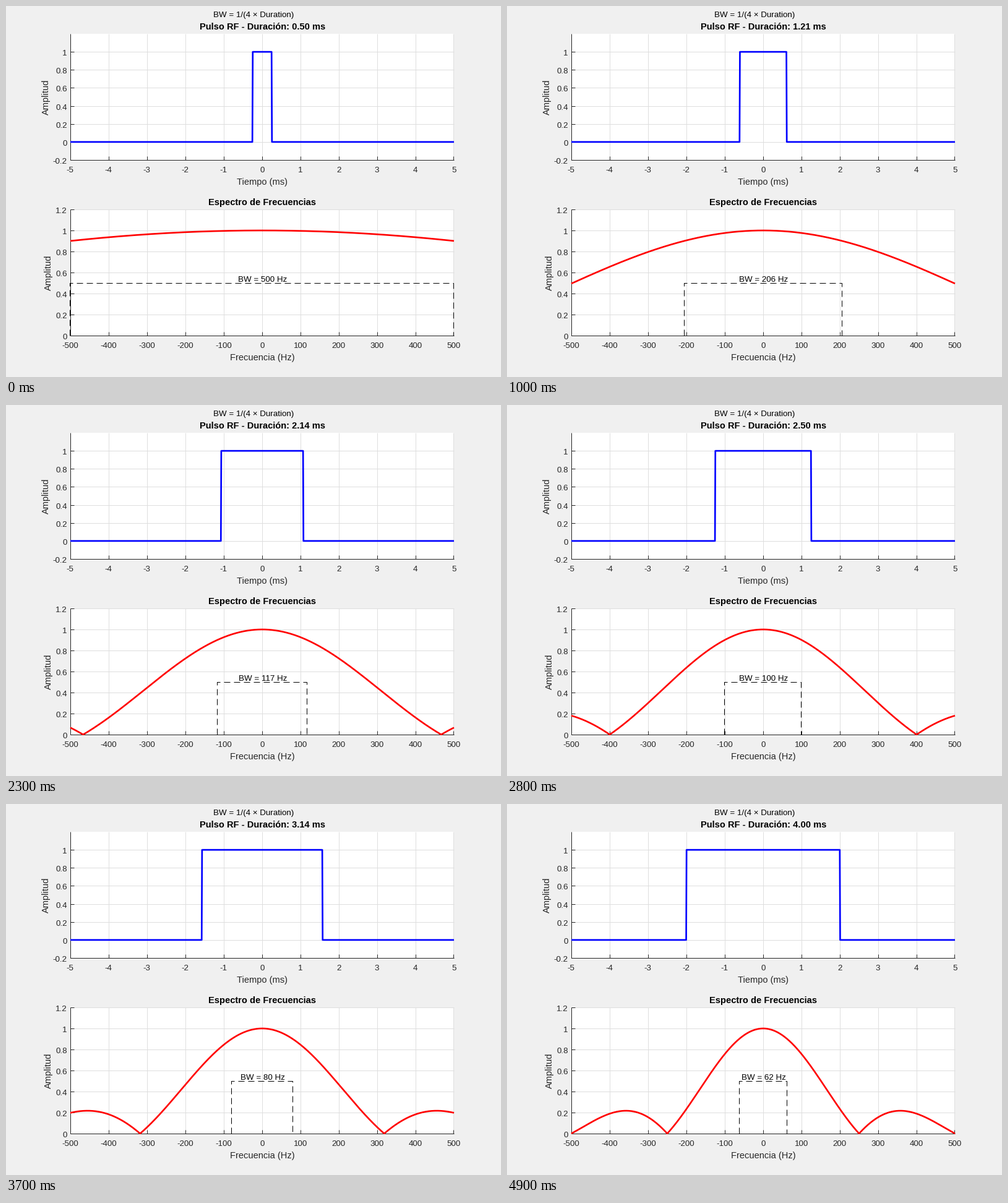
A matplotlib script for the animation above (5 s loop, 800 by 600 pixels).

```python
import numpy as np
import matplotlib.pyplot as plt
from matplotlib.animation import FuncAnimation
from matplotlib.patches import Rectangle

plt.rcParams["font.family"] = "Liberation Sans"
plt.rcParams["axes.unicode_minus"] = False

FRAMES = 50
PX = 0.72  # points per pixel at 100 dpi
INK = "#262626"
GRID = "#dedede"
SMALL, LARGE = 13.333, 14.667
LEFT, RIGHT = 104, 724

durations = np.linspace(0.5, 4, FRAMES)
time = np.linspace(-5, 5, 1000)
freq = np.linspace(-500, 500, 1000)

fig = plt.figure(figsize=(8, 6), dpi=100, facecolor="#f0f0f0")
stage = fig.add_axes([0, 0, 1, 1])
stage.set_xlim(0, 800)
stage.set_ylim(600, 0)
stage.axis("off")


def label(x, y, text, size=SMALL, color=INK, **kw):
    kw.setdefault("ha", "center")
    return stage.text(x, y, text, fontsize=size * PX, color=color,
                      va="baseline", zorder=6, **kw)


def line(xs, ys, color, width=1, **kw):
    kw.setdefault("solid_capstyle", "butt")
    return stage.plot(xs, ys, color=color, lw=width * PX, **kw)[0]


class Panel:
    """Plot area whose first and last pixel rows are top and bottom."""

    def __init__(self, top, bottom, x_lim, y_lim):
        self.top, self.bottom = top, bottom
        self.x_lim, self.y_lim = x_lim, y_lim
        stage.add_patch(Rectangle((LEFT, top), RIGHT - LEFT, bottom + 1 - top,
                                  fc="white", ec="none", zorder=0))

    def x(self, value):
        lo, hi = self.x_lim
        return LEFT + (np.asarray(value) - lo) / (hi - lo) * (RIGHT - LEFT)

    def y(self, value):
        lo, hi = self.y_lim
        return self.bottom - (np.asarray(value) - lo) / (hi - lo) * (self.bottom - self.top)

    def decorate(self, x_ticks, y_ticks, x_name, y_name_x):
        for v in x_ticks:
            x = min(self.x(v), RIGHT - 1)
            line([x, x], [self.top, self.bottom], GRID, zorder=1)
            line([x, x], [self.bottom - 6, self.bottom], INK, zorder=2)
            label(self.x(v) - 0.3, self.bottom + 20, f"{v:g}")
        for v in y_ticks:
            y = self.y(v)
            line([LEFT, RIGHT], [y, y], GRID, zorder=1)
            line([LEFT, LEFT + 6], [y, y], INK, zorder=2)
            label(98.7, y + 6, f"{v:g}", ha="right")
        line([LEFT, LEFT], [self.top, self.bottom], INK, zorder=2)
        line([LEFT, RIGHT], [self.bottom, self.bottom], INK, zorder=2)
        label(414, self.bottom + 40, x_name, LARGE)
        stage.text(y_name_x, (self.top + self.bottom) / 2, "Amplitud",
                   fontsize=LARGE * PX, color=INK, rotation=90,
                   rotation_mode="anchor", ha="center", va="baseline")


pulse = Panel(45, 249, (-5, 5), (-0.2, 1.2))
pulse.decorate(range(-5, 6), np.round(np.arange(-1, 6) * 0.2, 1) + 0.0,
               "Tiempo (ms)", 69)
spectrum = Panel(329, 533, (-500, 500), (0, 1.2))
spectrum.decorate(range(-500, 501, 100), np.round(np.arange(7) * 0.2, 1),
                  "Frecuencia (Hz)", 73)

label(400, 18, "BW = 1/(4 × Duration)", color="black")
title = label(414.3, 38, "", LARGE, "black", weight="bold")
label(413.8, 322, "Espectro de Frecuencias", LARGE, "black", weight="bold")
band_text = label(414.7, 446, "", color="black")

pulse_line = line([], [], "#0000ff", 2.667, zorder=4, solid_joinstyle="round")
spectrum_line = line([], [], "#ff0000", 2.667, zorder=4, solid_joinstyle="round")
band_line = line([], [], "black", zorder=5, dashes=(10, 6), dash_capstyle="butt")


def update(i):
    d = durations[i]
    band = 1000 / (4 * d)
    title.set_text(f"Pulso RF - Duración: {d:.2f} ms")
    band_text.set_text(f"BW = {band:.0f} Hz")
    pulse_line.set_data(pulse.x(time), pulse.y(np.abs(time) <= d / 2))
    spectrum_line.set_data(spectrum.x(freq),
                           spectrum.y(np.abs(np.sinc(freq * d / 1000))))
    # Half a pixel left, so the verticals settle on the lower pixel column.
    band_line.set_data(spectrum.x([-band, -band, band, band]) - 0.51,
                       spectrum.y([0, 0.5, 0.5, 0]))
    return title, band_text, pulse_line, spectrum_line, band_line


anim = FuncAnimation(fig, update, frames=FRAMES, interval=100,
                     repeat=True, repeat_delay=0)
plt.show()
```
